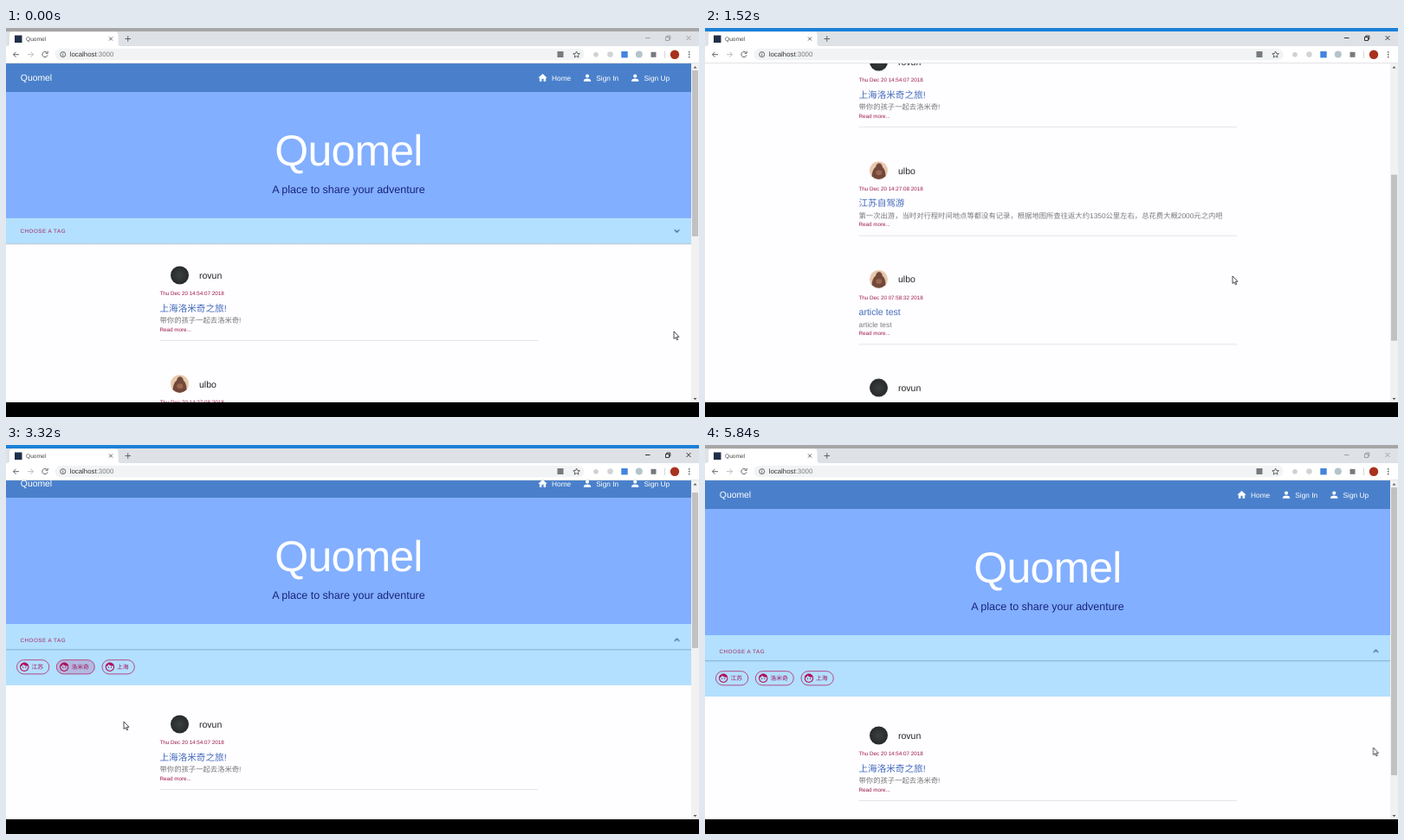
Recreate the animation shown at these times as an HTML page. Size 800 by 450 pixels, loop 5880 ms.

```html
<!DOCTYPE html>
<html lang="en">
<head>
<meta charset="utf-8">
<title>Quomel</title>
<style>
html, body { margin: 0; width: 100%; height: 100%; overflow: hidden; background: #000; }
svg { display: block; }
text { font-family: "Liberation Sans", Arial, "Noto Sans CJK SC", "Noto Sans CJK", sans-serif; text-rendering: geometricPrecision; }
.line { fill: none; stroke: #5f6368; stroke-width: 1; }
.faint { stroke: #b8babd; }

/* page text */
.nav { font-size: 8.33px; fill: #fff; }
.brand { font-size: 10.4px; fill: #fff; }
.hero { font-size: 50px; letter-spacing: -.78px; fill: #fff; text-anchor: middle; }
.sub { font-size: 12.5px; fill: #1a237e; text-anchor: middle; }
.pick { font-size: 6.25px; letter-spacing: .52px; fill: #a3225f; }
.user { font-size: 10.5px; fill: #222; }
.small { font-size: 6.27px; fill: #9c1846; }
.title { font-size: 10.6px; fill: #4069bb; }
.body { font-size: 8.34px; fill: #777; }
.rule { stroke: #e3e3e8; stroke-width: 1; }
.chip rect { fill: none; stroke: #b3246b; stroke-width: .8; }
.chip text { font-size: 6.8px; fill: #a3145c; }
.chip use { fill: #b0105a; }

/* motion */
.scroll, .thumb, .panel, .label, .chips, .below, .chevron, .others, .focus, .active, .controls, .cursor {
  animation: 5880ms linear infinite;
}
.scroll { animation-name: scroll; }
@keyframes scroll {
  0%, 10.88% { transform: translateY(0); }
  18.37% { transform: translateY(-229px); }
  22.45%, 23.8% { transform: translateY(-376px); }
  29.6% { transform: translateY(-13.8px); }
  30.6%, 57.82% { transform: translateY(-13px); }
  62.93% { transform: translateY(-300px); }
  67.35% { transform: translateY(-169px); }
  71.09%, 78.23% { transform: translateY(-13px); }
  79.6%, 100% { transform: translateY(0); }
}
.thumb { animation-name: thumb; }
@keyframes thumb {
  0%, 10.88% { y: 49px; height: 192px; }
  18.37% { y: 161px; height: 192px; }
  22.45%, 23.8% { y: 233px; height: 192px; }
  29.6%, 36.05% { y: 55.5px; height: 192px; }
  40.14%, 47.62% { y: 55px; height: 180px; }
  47.63%, 52.38% { y: 60px; height: 333px; }
  52.39%, 57.82% { y: 55px; height: 180px; }
  62.93% { y: 187px; height: 180px; }
  67.35% { y: 126.5px; height: 180px; }
  71.09%, 78.23% { y: 55px; height: 180px; }
  78.24% { y: 60px; height: 333px; }
  79.6%, 100% { y: 49px; height: 333px; }
}
.panel { animation-name: panel; }
@keyframes panel {
  0%, 36.05% { height: 29px; animation-timing-function: cubic-bezier(.4, 0, .2, 1); }
  40.14%, 100% { height: 71px; }
}
.label { animation-name: label; }
@keyframes label {
  0%, 36.05% { transform: translateY(0); animation-timing-function: cubic-bezier(.4, 0, .2, 1); }
  40.14%, 100% { transform: translateY(4px); }
}
.below { animation-name: below; }
@keyframes below {
  0%, 36.05% { transform: translateY(0); animation-timing-function: cubic-bezier(.4, 0, .2, 1); }
  40.14%, 100% { transform: translateY(50px); }
}
.chips { animation-name: chips; }
@keyframes chips {
  0%, 38% { opacity: 0; }
  39.5%, 100% { opacity: 1; }
}
.chevron { transform-box: fill-box; transform-origin: center; animation-name: flip; }
@keyframes flip {
  0%, 36.05% { transform: scaleY(1); }
  38.6%, 100% { transform: scaleY(-1); }
}
.others { animation-name: others; }
@keyframes others {
  0%, 47.62% { opacity: 1; }
  47.63%, 52.38% { opacity: 0; }
  52.39%, 78.23% { opacity: 1; }
  78.24%, 100% { opacity: 0; }
}
.chip .focus { fill: #b3246b; fill-opacity: .2; animation-name: focus; }
@keyframes focus {
  0%, 46.6% { fill-opacity: 0; }
  47.6%, 93.2% { fill-opacity: .2; }
  93.5%, 100% { fill-opacity: 0; }
}
.active { animation-name: active; }
@keyframes active {
  0%, 4.76% { fill: #a6a6a6; }
  4.77%, 91.8% { fill: #1a80d8; }
  91.81%, 100% { fill: #a6a6a6; }
}
.controls { animation-name: controls; }
@keyframes controls {
  0%, 4.76% { stroke: #999; }
  4.77%, 91.8% { stroke: #222; }
  91.81%, 100% { stroke: #999; }
}
.cursor { animation-name: cursor; }
@keyframes cursor {
  0%, 1.36% { transform: translate(771px, 351px); }
  8.16%, 31.6% { transform: translate(609px, 287px); }
  35.7%, 41.5% { transform: translate(773px, 220px); }
  46.6%, 53.06% { transform: translate(84px, 256px); }
  55.8%, 73.8% { transform: translate(136px, 320px); }
  77.2%, 78.9% { transform: translate(84px, 256px); }
  83.3%, 85% { transform: translate(412px, 328.5px); }
  91.8%, 100% { transform: translate(771.5px, 350px); }
}
</style>
</head>
<body>
<svg width="800" height="450" viewBox="0 0 800 450">
  <defs>
    <path id="home" transform="scale(.52)" d="M10 20v-6h4v6h5v-8h3L12 3 2 12h3v8z"/>
    <path id="person" transform="scale(.52)" d="M12 12c2.21 0 4-1.79 4-4s-1.79-4-4-4-4 1.79-4 4 1.79 4 4 4zm0 2c-2.67 0-8 1.34-8 4v2h16v-2c0-2.66-5.33-4-8-4z"/>
    <path id="face" transform="scale(.52)" fill-rule="evenodd" d="M7.75 13a1.25 1.25 0 1 0 2.5 0a1.25 1.25 0 1 0-2.5 0zM13.75 13a1.25 1.25 0 1 0 2.5 0a1.25 1.25 0 1 0-2.5 0zM12 2C6.48 2 2 6.48 2 12s4.48 10 10 10 10-4.48 10-10S17.52 2 12 2zm0 18c-4.41 0-8-3.59-8-8 0-.29.02-.58.05-.86 2.36-1.05 4.23-2.98 5.21-5.37C11.07 8.33 14.05 10 17.42 10c.78 0 1.53-.09 2.25-.26.21.71.33 1.47.33 2.26 0 4.41-3.59 8-8 8z"/>
    <radialGradient id="night"><stop offset="0" stop-color="#3c4040"/><stop offset="1" stop-color="#272a2b"/></radialGradient>
    <linearGradient id="shade" x2="0" y2="1"><stop offset="0" stop-color="#5c87a8" stop-opacity=".55"/><stop offset="1" stop-color="#5c87a8" stop-opacity="0"/></linearGradient>
    <g id="dark"><circle cx="200.5" cy="286" r="10.5" fill="url(#night)"/></g>
    <g id="warm">
      <circle cx="200.5" cy="286" r="10.5" fill="#e8c9ae"/>
      <path d="M192.5 292.8Q193 285 197 282Q198 277.5 201 277.5Q204.5 278 204.8 282Q208.5 285 208.5 292.8Q200.5 299.8 192.5 292.8z" fill="#72483b"/>
      <ellipse cx="200.8" cy="288.5" rx="3.6" ry="3" fill="#99664f"/>
    </g>
  </defs>

  <!-- page -->
  <svg y="41" width="791" height="392" viewBox="0 41 791 392">
    <rect y="41" width="791" height="392" fill="#fefdff"/>
    <g class="scroll">
      <rect y="41" width="791" height="33.3" fill="#4a80cb"/>
      <text class="brand" x="16.8" y="61.3">Quomel</text>
      <g fill="#fff">
        <use href="#home" x="613.3" y="51.4"/>
        <use href="#person" x="664.8" y="51.3"/>
        <use href="#person" x="720" y="51.3"/>
      </g>
      <g class="nav">
        <text x="630" y="60.5">Home</text>
        <text x="681.3" y="60.5">Sign In</text>
        <text x="736.5" y="60.5">Sign Up</text>
      </g>
      <rect y="74" width="791" height="146" fill="#82afff"/>
      <text class="hero" x="395.5" y="158.5">Quomel</text>
      <text class="sub" x="395.5" y="191">A place to share your adventure</text>

      <rect class="panel" y="220" width="791" height="29" fill="#b3e0ff"/>
      <g class="label">
        <text class="pick" x="16.5" y="236.7">CHOOSE A TAG</text>
        <g transform="translate(774.5 234.7)"><path class="chevron" d="M-2.7-1.4L0 1.3L2.7-1.4" fill="none" stroke="#2a5a86" stroke-width="1.2"/></g>
      </g>
      <g class="chips">
        <g class="chip">
          <rect x="12.5" y="261.7" width="37.3" height="16.2" rx="8.1"/>
          <use href="#face" x="15" y="263.5"/>
          <text x="29.5" y="272.2">江苏</text>
        </g>
        <g class="chip">
          <rect class="focus" x="58.3" y="261.7" width="44" height="16.2" rx="8.1"/>
          <use href="#face" x="61" y="263.5"/>
          <text x="75.5" y="272.2">洛米奇</text>
        </g>
        <g class="chip">
          <rect x="111" y="261.7" width="37.3" height="16.2" rx="8.1"/>
          <use href="#face" x="113.7" y="263.5"/>
          <text x="128" y="272.2">上海</text>
        </g>
      </g>
      <svg class="panel" y="220" width="791" height="29" overflow="visible">
        <rect y="100%" width="791" height="2" fill="url(#shade)"/>
      </svg>

      <g class="below">
        <g>
          <use href="#dark"/>
          <text class="user" x="223" y="290">rovun</text>
          <text class="small" x="177.5" y="309.2">Thu Dec 20 14:54:07 2018</text>
          <text class="title" x="177.5" y="327.8">上海洛米奇之旅!</text>
          <text class="body" x="177.5" y="341.2">带你的孩子一起去洛米奇!</text>
          <text class="small" x="177.5" y="350.8">Read more...</text>
          <path class="rule" d="M177.5 361.5H614"/>
        </g>
        <g class="others">
          <g transform="translate(0 125.7)">
            <use href="#warm"/>
            <text class="user" x="223" y="290">ulbo</text>
            <text class="small" x="177.5" y="309.2">Thu Dec 20 14:27:08 2018</text>
            <text class="title" x="177.5" y="327.8">江苏自驾游</text>
            <text class="body" x="177.5" y="341.2">第一次出游，当时对行程时间地点等都没有记录，根据地图所查往返大约1350公里左右，总花费大概2000元之内吧</text>
            <text class="small" x="177.5" y="350.8">Read more...</text>
            <path class="rule" d="M177.5 361.5H614"/>
          </g>
          <g transform="translate(0 251.4)">
            <use href="#warm"/>
            <text class="user" x="223" y="290">ulbo</text>
            <text class="small" x="177.5" y="309.2">Thu Dec 20 07:58:32 2018</text>
            <text class="title" x="177.5" y="327.8">article test</text>
            <text class="body" x="177.5" y="341.2">article test</text>
            <text class="small" x="177.5" y="350.8">Read more...</text>
            <path class="rule" d="M177.5 361.5H614"/>
          </g>
          <g transform="translate(0 377.1)">
            <use href="#dark"/>
            <text class="user" x="223" y="290">rovun</text>
            <text class="small" x="177.5" y="309.2">Thu Dec 20 07:45:10 2018</text>
            <text class="title" x="177.5" y="327.8">test</text>
            <text class="body" x="177.5" y="341.2">test</text>
            <text class="small" x="177.5" y="350.8">Read more...</text>
            <path class="rule" d="M177.5 361.5H614"/>
          </g>
        </g>
      </g>
    </g>
  </svg>

  <!-- scrollbar -->
  <rect x="791" y="41" width="9" height="392" fill="#f1f1f1"/>
  <rect class="thumb" x="792" y="49" width="7" height="192" fill="#c1c1c1"/>
  <path d="M793.5 46.5l2-2.2 2 2.2zM793.5 428l2 2.2 2-2.2z" fill="#555"/>

  <!-- browser frame -->
  <rect width="800" height="41" fill="#fff"/>
  <rect y="3" width="800" height="18" fill="#dee1e6"/>
  <rect class="active" width="800" height="4" fill="#a6a6a6"/>
  <path d="M1 21Q4 21 4 18V8Q4 4.500 7.500 4.500H126Q129.500 4.500 129.500 8V18Q129.500 21 132.500 21z" fill="#fff"/>
  <rect x="10" y="8.500" width="8.500" height="8.500" fill="#20304a"/>
  <text x="23" y="15.200" font-size="6.600" fill="#444">Quomel</text>
  <path class="line" d="M119 10.500l4 4m0-4l-4 4M137.500 12.500h6.500m-3.250-3.250v6.500"/>
  <g class="controls" fill="none" stroke="#999" stroke-width=".9">
    <path d="M738 11.500h5.500M785.500 9l5 5m0-5l-5 5"/>
    <path d="M761.500 10.500h4v4h-4zM762.800 10.300v-1.300h4v4h-1.200"/>
  </g>

  <path class="line" d="M15 30.700H8.500m3-3l-3 3 3 3"/>
  <path class="line faint" d="M25 30.700h6.500m-3-3l3 3-3 3"/>
  <path class="line" d="M47.300 28.500A3.100 3.100 0 1 0 48 31.300M48.200 26.800v2.500h-2.500"/>
  <rect x="56.500" y="23.700" width="611" height="13.600" rx="6.800" fill="#f1f3f4"/>
  <circle class="line" cx="65.700" cy="30.600" r="3" stroke-width=".8"/>
  <path class="line" d="M65.700 30.200v2.200m0-3.800v.8" stroke-width=".8"/>
  <text x="73.700" y="33.300" font-size="7.850" fill="#333">localhost<tspan fill="#7a7d82">:3000</tspan></text>
  <rect x="636.500" y="27" width="7" height="7" fill="#777a7f"/>
  <path class="line" stroke-width=".8" d="M658.600 27l1.100 2.500 2.700.2-2.100 1.800.7 2.600-2.400-1.400-2.400 1.400.7-2.600-2.100-1.800 2.700-.2z"/>
  <circle cx="681" cy="30.800" r="2.800" fill="#d0d0d0"/>
  <circle cx="697.500" cy="30.600" r="3.300" fill="#d3d3d5"/>
  <rect x="710.300" y="27" width="7.400" height="7.400" fill="#4285e0"/>
  <circle cx="730.800" cy="30.600" r="4" fill="#b5c4cb"/>
  <rect x="744.500" y="27.800" width="6" height="6" fill="#77797c"/>
  <path d="M760.500 26.500v8.500" stroke="#d5d7da"/>
  <circle cx="772" cy="30.700" r="5.200" fill="#a8321d"/>
  <g fill="#5f6368"><circle cx="788.700" cy="27.800" r=".9"/><circle cx="788.700" cy="30.700" r=".9"/><circle cx="788.700" cy="33.600" r=".9"/></g>
  <rect y="40" width="800" height="1" fill="#e3e4e6"/>
  <rect y="433" width="800" height="17"/>

  <path class="cursor" d="M0 0V8.600L2 6.800 3.400 9.900 4.700 9.300 3.400 6.300H6z" fill="#fff" stroke="#222" stroke-width=".8"/>
</svg>
</body>
</html>
```
